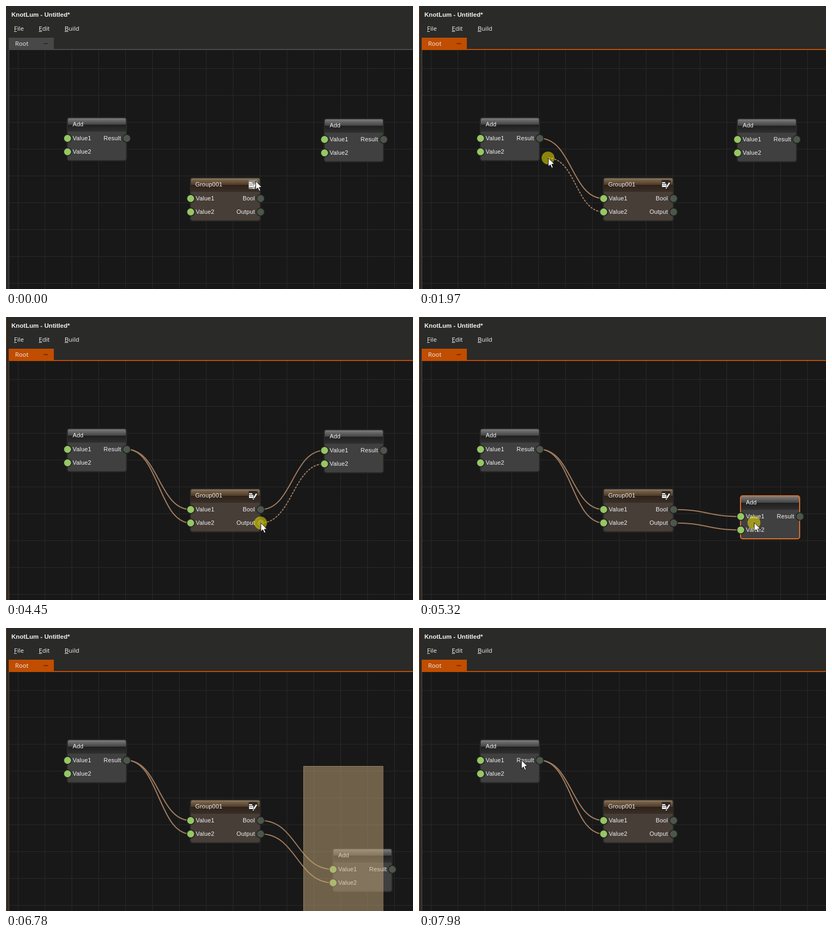
An HTML page with a canvas for the animation above (8000 ms loop, 757 by 527 pixels).

```html
<!DOCTYPE html>
<html lang="en">
<head>
<meta charset="utf-8">
<title>Node editor</title>
<style>
  html, body { margin: 0; width: 100%; height: 100%; overflow: hidden; background: #2a2a28; }
  canvas { display: block; }
</style>
</head>
<body>
<canvas id="stage" width="757" height="527"></canvas>
<script>
const W = 757, H = 527, LOOP = 8000, STEP = 109.4;
const ctx = document.getElementById('stage').getContext('2d');
const UI = '"Open Sans", "Noto Sans", sans-serif';
const SANS = '"Liberation Sans", Arial, sans-serif';
const ORANGE = '#c04d00', SELECTED = '#d9702b', WIRE = '#a07b5e';

const gray = { header: ['#7c7c7c', '#444', '#1f1f1f', '#303030'], body: '#404040' };
const brown = { header: ['#8d785b', '#553f2b', '#2e231b', '#3a2e25'], body: '#473e38' };
const left = { x: 114, y: 208, w: 110, title: 'Add', outputs: ['Result'], tint: gray };
const start = { ...left, x: 592, y: 210 };
const group = { x: 343, y: 320, w: 130, title: 'Group001', outputs: ['Bool', 'Output'], tint: brown, group: true };

const point = (x, y) => ({ x, y });
const input = (node, row) => point(node.x + .5, node.y + 38.5 + 25 * row);
const output = (node, row) => point(node.x + node.w + .5, node.y + 38.5 + 25 * row);

// Pointer stops, all times in screen updates: arrive, depart, place
const bandStart = point(553, 257);
const stops = [
  [0, 1, point(464, 326)],
  [6, 7, output(left, 0)],
  [10, 12, input(group, 0)],
  [14, 15, input(group, 1)],
  [18, 18, point(240, 283)],
  [20, 21, output(left, 0)],
  [24, 26, output(group, 0)],
  [31, 33, point(586, 252)],
  [35, 37, input(start, 1)],
  [41, 44, output(group, 1)],
  [47, 47, point(617, 260)],
  [49, 49, point(623, 383)],
  [52, 53, point(633, 461)],
  [56, 56, point(517, 309)],
  [59, 59, bandStart],
  [62, 66, point(701, 545)],
  [73, 74, point(190, 246)]
];

// Mouse button held: four wires, one node move, one rubber band
const wireHolds = [[6, 12], [14, 21], [26, 33], [37, 44]];
const moveHold = [47, 53], bandHold = [59, 63], DELETED = 66;
const holds = [...wireHolds, moveHold, bandHold];

const within = (n, [a, b]) => n >= a && n < b;
const ease = k => k * k * (3 - 2 * k);

function pointerAt(n) {
  const i = stops.findLastIndex(s => s[0] <= n);
  const [, depart, a] = stops[i];
  if (n <= depart) return a;
  const [arrive, , b] = stops[i + 1];
  const k = ease((n - depart) / (arrive - depart));
  return point(a.x + (b.x - a.x) * k, a.y + (b.y - a.y) * k);
}

function rect(color, x, y, w, h) {
  ctx.fillStyle = color;
  ctx.fillRect(x, y, w, h);
}

function disc(color, x, y, r) {
  ctx.fillStyle = color;
  ctx.beginPath();
  ctx.arc(x, y, r, 0, 7);
  ctx.fill();
}

function label(text, x, y, font, align = 'left', spacing = 0) {
  ctx.font = font;
  ctx.textAlign = align;
  ctx.letterSpacing = spacing + 'px';
  ctx.fillStyle = '#f2f2f2';
  ctx.fillText(text, x, y);
}

function drawWindow(active) {
  rect('#2a2a28', 0, 0, W, H);
  rect('#181818', 5, 81, W, H);
  for (let x = 22; x < W; x += 50) rect('#292929', x, 82, 1, H);
  for (let y = 116; y < H; y += 50) rect('#292929', 6, y, W, 1);
  rect('#4a4a4a', 5, 82, 1, H);
  if (active) rect('#7f3600', 0, 0, 1, H);

  const accent = active ? ORANGE : '#484848';
  rect(accent, 5, 59, 84, 22);
  rect(accent, 5, 80, W, 2);
  rect(active ? '#7a3000' : '#2c2c2c', 70, 69, 8, 2);
  label('Root', 17, 74, '11.3px ' + UI);

  label('KnotLum - Untitled*', 10, 20, 'bold 11.6px ' + SANS);
  [['File', 15, 5], ['Edit', 61, 6], ['Build', 109, 7]].forEach(([name, x, w]) => {
    label(name, x, 46, '11.5px ' + UI);
    rect('#e0e0e0', x, 47, w, 1);
  });
}

function drawWire(a, b, color, dashed) {
  const mid = (a.x + b.x) / 2;
  ctx.strokeStyle = color;
  ctx.lineWidth = 2;
  ctx.setLineDash(dashed ? [4, 2] : []);
  ctx.beginPath();
  ctx.moveTo(a.x, a.y);
  ctx.bezierCurveTo(mid, a.y, mid, b.y, b.x, b.y);
  ctx.stroke();
  ctx.setLineDash([]);
}

function drawPort({ x, y }, color) {
  disc('#20211f', x, y, 8);
  disc(color, x, y, 6.5);
}

function drawIcon(x, y, hover) {
  ctx.fillStyle = hover ? '#8f8d88' : '#2e2925';
  ctx.beginPath();
  ctx.roundRect(x, y, 17, 17, 3);
  ctx.fill();
  rect('#f4f4f4', x + 1, y + 4, 6, 2);
  rect('#f4f4f4', x + 1, y + 7, 8, 6);
  rect('#55504a', x + 2, y + 9, 6, 1);
  ctx.strokeStyle = '#f4f4f4';
  ctx.lineWidth = 2.6;
  ctx.beginPath();
  ctx.moveTo(x + 15, y + 5);
  ctx.lineTo(x + 10, y + 13);
  ctx.stroke();
  rect('#f4f4f4', x + 8, y + 14, 2, 2);
}

function drawNode(node, selected, hover) {
  const { x, y, w, title, outputs, tint } = node;
  const h = 80, font = '11px ' + SANS;
  const header = ctx.createLinearGradient(0, y + 1, 0, y + 26);
  tint.header.forEach((c, i) => header.addColorStop([0, .46, .48, 1][i], c));

  ctx.save();
  ctx.beginPath();
  ctx.roundRect(x, y, w, h, 4);
  ctx.save();
  ctx.clip();
  rect(tint.body, x, y, w, h);
  rect(header, x, y, w, 26);
  if (node.group) for (let i = 4; i < 15; i += 3) rect('rgba(30,18,8,.22)', x, y + i, w, 1);
  ctx.restore();
  ctx.beginPath();
  ctx.roundRect(x, y, w, h, 4);
  ctx.lineWidth = 2;
  ctx.strokeStyle = selected ? SELECTED : '#2a2a29';
  ctx.stroke();
  ctx.restore();

  label(title, x + (node.group ? 9 : 10), y + 16, font, 'left', .2);
  ['Value1', 'Value2'].forEach((name, i) => {
    label(name, x + 10, y + 42 + 25 * i, font, 'left', .2);
    drawPort(input(node, i), '#96c764');
  });
  outputs.forEach((name, i) => {
    label(name, x + w - 10, y + 42 + 25 * i, font, 'right', .2);
    drawPort(output(node, i), '#4d564b');
  });
  if (node.group) drawIcon(x + 108, y + 4, hover);
}

function drawPointer({ x, y }, pressed) {
  if (pressed) disc('rgba(255,240,0,.5)', x, y, 12);
  ctx.save();
  ctx.translate(x + .5, y);
  ctx.beginPath();
  [[0, 0], [0, 16], [3.7, 12.6], [6.3, 18.6], [8.9, 17.5], [6.4, 11.7], [11.4, 11.5]]
    .forEach(p => ctx.lineTo(...p));
  ctx.closePath();
  ctx.fillStyle = '#fff';
  ctx.fill();
  ctx.lineWidth = 1;
  ctx.strokeStyle = '#111';
  ctx.stroke();
  ctx.restore();
}

function render(n) {
  const mouse = pointerAt(n);
  const grabbed = pointerAt(moveHold[0]);
  const carried = pointerAt(Math.min(Math.max(n, moveHold[0]), moveHold[1]));
  const right = {
    ...start,
    x: Math.round(start.x + carried.x - grabbed.x),
    y: Math.round(start.y + carried.y - grabbed.y)
  };
  const boxed = within(n, [bandHold[1], DELETED]);
  const selected = boxed || within(n, [moveHold[0], bandHold[0]]);

  drawWindow(n >= holds[0][0]);

  // A dragged end follows the mouse and snaps to its port when close
  const dragEnd = port => Math.hypot(port.x - mouse.x, port.y - mouse.y) < 15 ? port : mouse;
  wireHolds.forEach(([press, release], i) => {
    const onRight = i > 1, fromInput = i % 2;
    if (n < press || (onRight && n >= DELETED)) return;
    const dragging = n < release;
    let from = onRight ? output(group, i - 2) : output(left, 0);
    let to = input(onRight ? right : group, i % 2);
    if (dragging) fromInput ? from = dragEnd(from) : to = dragEnd(to);
    drawWire(from, to, onRight && boxed ? SELECTED : WIRE, dragging);
  });

  const hover = mouse.x > 450 && mouse.x < 469 && mouse.y > 323 && mouse.y < 342;
  drawNode(left);
  drawNode(group, false, hover);
  if (n < DELETED) drawNode(right, selected);

  if (within(n, bandHold)) {
    const { x, y } = bandStart, w = mouse.x - x, h = mouse.y - y;
    rect('rgba(198,170,122,.5)', x, y, w, h);
    ctx.lineWidth = 1;
    ctx.strokeStyle = 'rgba(175,152,112,.6)';
    ctx.strokeRect(x + .5, y + .5, w, h);
  }
  drawPointer(mouse, holds.some(hold => within(n, hold)));
}

function tick() {
  render(Math.floor(performance.now() % LOOP / STEP + .4));
  requestAnimationFrame(tick);
}
tick();
</script>
</body>
</html>
```
